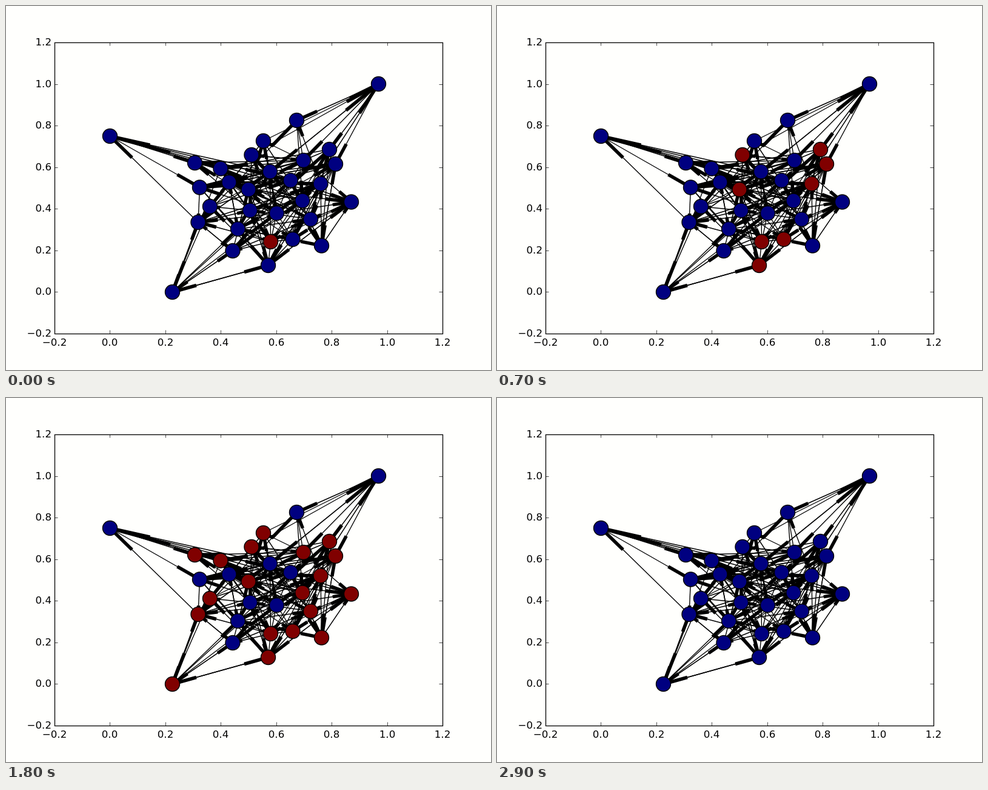
An HTML page with a canvas that plays this animation: 800 by 600 pixels, repeating every 3000 ms.

```html
<!DOCTYPE html>
<html lang="en">
<head>
<meta charset="utf-8">
<title>Spread through a directed network</title>
<style>
  html, body { margin: 0; width: 100%; height: 100%; overflow: hidden; background: #fffffd; }
  canvas { display: block; }
</style>
</head>
<body>
<canvas id="stage" width="800" height="600"></canvas>
<script>
const ctx = document.getElementById('stage').getContext('2d');
const PT = 100 / 72;
const STEP = 100;
const PAPER = '#fffffd', BLUE = '#000080', RED = '#800000';

// Pixel positions, counted from pixel centres
const nodes = {
  A: [614, 128], B: [479, 188], C: [424, 222], D: [171, 214], E: [404.5, 245],
  F: [533, 236], G: [543, 260], H: [490, 254], I: [311, 258], J: [353.5, 267.5],
  K: [435, 272.5], L: [367.5, 290], M: [319, 298.5], N: [399.5, 302], O: [469, 287],
  P: [518.5, 292.5], Q: [569, 322.5], R: [488.5, 320.5], S: [336, 330], T: [402, 336.5],
  U: [446, 341], V: [502, 351], W: [316.5, 356], X: [382, 367], Y: [436, 388],
  Z: [472.5, 384], a: [520, 394.5], b: [373.5, 403], c: [432, 427], d: [274, 471]
};

// Incoming neighbours of each node
const incoming = {
  A: 'ERCN', B: 'AWPH', C: 'UXKH', D: 'WQK', E: 'UVHK', F: 'AYdVH', G: 'AMTaKR',
  H: 'ASNEO', I: 'DHTUK', J: 'DHFYVRN', K: 'AXWYUV', L: 'WHVXRKO', M: 'DOGULH',
  N: 'GZbRJV', O: 'DSXaFU', P: 'WXLaUZF', Q: 'NHKUaYc', R: 'BCFbTG', S: 'dCcT',
  T: 'PcEWVN', U: 'CLGKdNX', V: 'XGNbQF', W: 'dUKEMbY', X: 'dPKMZLTc',
  Y: 'LNRXUV', Z: 'XTGQPURY', a: 'GXOKZF', b: 'dPOWY', c: 'dMRPQNYTZ', d: 'cJbW'
};

const order = 'YZcNPGFEQaIJCHRSVWdAKOXBLMTUbD';

function line(x1, y1, x2, y2, width) {
  ctx.lineWidth = width;
  ctx.beginPath();
  ctx.moveTo(x1, y1);
  ctx.lineTo(x2, y2);
  ctx.stroke();
}

// A heavy final quarter marks the head of the edge
function drawEdge([x1, y1], [x2, y2]) {
  line(x1, y1, x2, y2, PT);
  line(x2 + (x1 - x2) / 4, y2 + (y1 - y2) / 4, x2, y2, 4 * PT);
}

function drawNode([x, y], color) {
  ctx.beginPath();
  ctx.arc(x, y, Math.sqrt(300) / 2 * PT, 0, 2 * Math.PI);
  ctx.fillStyle = color;
  ctx.fill();
  ctx.lineWidth = PT;
  ctx.stroke();
}

function drawAxes() {
  ctx.lineWidth = 1.3;
  ctx.strokeRect(80.5, 60.5, 640, 480);
  ctx.fillStyle = '#000';
  ctx.font = `${12 * PT}px "DejaVu Sans", sans-serif`;
  const tick = 4 * PT;
  for (let i = 0; i < 8; i++) {
    const label = ((i - 1) / 5).toFixed(1).replace('-', '\u2212');
    const x = Math.round(80 + i * 640 / 7);
    const y = Math.round(540 - i * 480 / 7);
    line(x + 0.5, 60, x + 0.5, 60 + tick, 0.7);
    line(x + 0.5, 540, x + 0.5, 540 - tick, 0.7);
    line(80, y + 0.5, 80 + tick, y + 0.5, 0.7);
    line(720, y + 0.5, 720 - tick, y + 0.5, 0.7);
    ctx.textAlign = 'center';
    ctx.fillText(label, x, 560);
    ctx.textAlign = 'right';
    ctx.fillText(label, 75, y + 5);
  }
}

function draw(step) {
  ctx.fillStyle = PAPER;
  ctx.fillRect(0, 0, 800, 600);
  ctx.strokeStyle = '#000';

  // A uniform network falls back to the low end of the colour map
  const reached = step + 1 < order.length ? order.slice(0, step + 1) : '';
  ctx.save();
  ctx.translate(0.5, 0.5);
  for (const [to, sources] of Object.entries(incoming))
    for (const from of sources) drawEdge(nodes[from], nodes[to]);
  for (const [name, point] of Object.entries(nodes))
    drawNode(point, reached.includes(name) ? RED : BLUE);
  ctx.restore();
  drawAxes();
}

const start = performance.now();
function tick() {
  const elapsed = Math.max(0, performance.now() - start);
  draw(Math.floor(elapsed / STEP) % order.length);
  requestAnimationFrame(tick);
}
tick();
</script>
</body>
</html>
```
